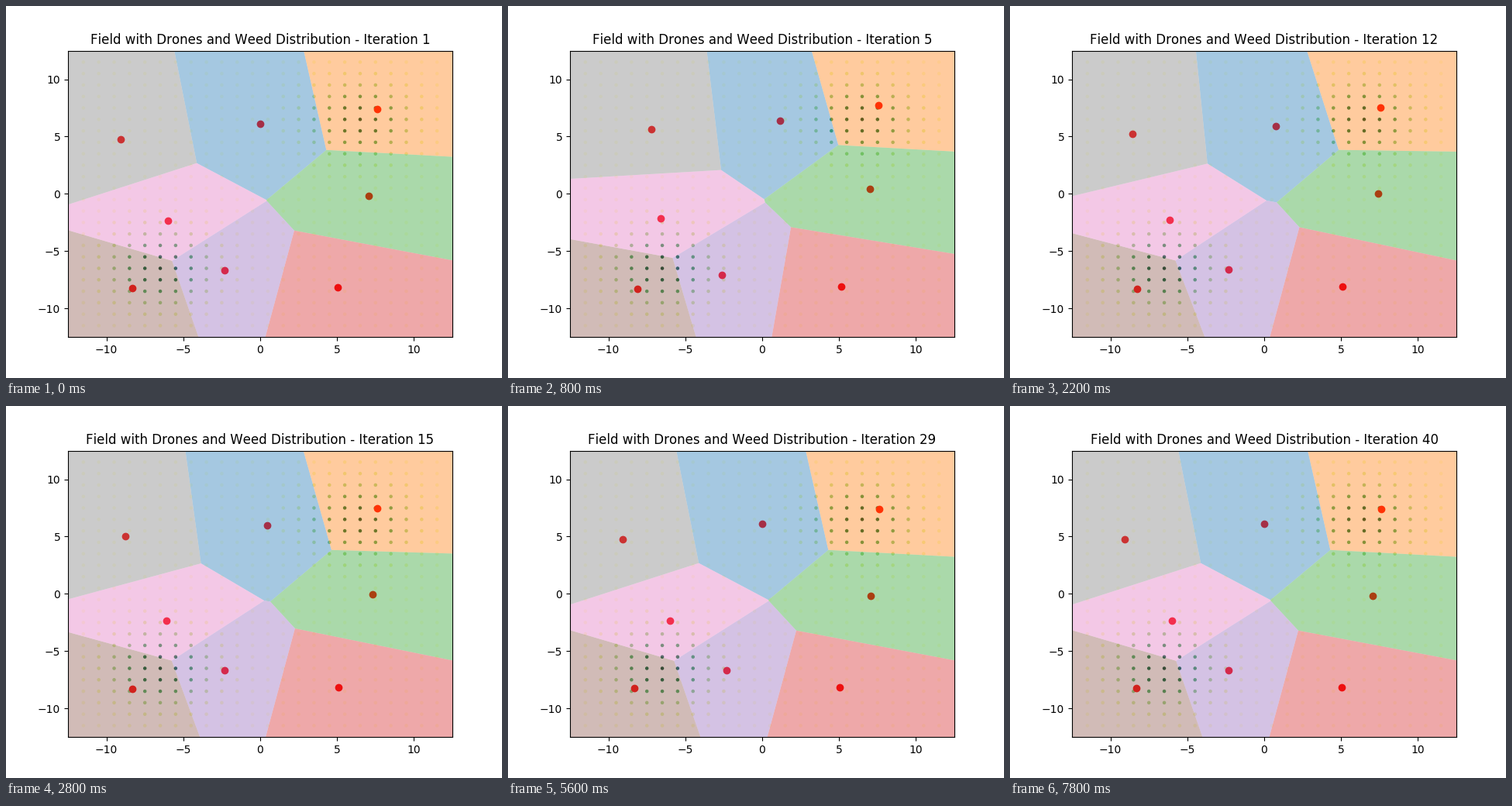
Write a matplotlib script that moves like this. It is 640 px wide and 480 px high and loops after 8 s.

```python
import numpy as np
import matplotlib.pyplot as plt
from matplotlib.animation import FuncAnimation
from matplotlib.patches import Polygon

plt.rcParams["text.kerning_factor"] = 6

FRAMES, STEP_MS = 40, 200
HALF = 12.5  # the field spans -HALF..HALF on both axes
CORNERS = HALF * np.array([(-1, -1), (1, -1), (1, 1), (-1, 1)])

# Each drone heads from its start past a turning point to its rest
START, TURN, REST = np.array([
    [(1.16, 6.39), (7.56, 7.74), (7.01, 0.43), (5.14, -8.09),
     (-2.62, -7.08), (-8.11, -8.29), (-6.6, -2.14), (-7.21, 5.64)],
    [(1.01, 5.84), (7.56, 7.6), (7.56, 0.1), (5.14, -8.09),
     (-2.32, -6.6), (-8.27, -8.36), (-6.2, -2.27), (-8.37, 5.37)],
    [(0, 6.11), (7.61, 7.4), (7.06, -0.18), (5.04, -8.16),
     (-2.32, -6.67), (-8.32, -8.22), (-6, -2.34), (-9.07, 4.76)],
])
START_AT, TURN_AT, REST_AT = 5, 9, 20


def drones_at(iteration):
    """Drone positions; the first iteration shows the settled state."""
    if iteration == 1 or iteration >= REST_AT:
        return REST
    if iteration < TURN_AT:
        u = (iteration - START_AT) / (TURN_AT - START_AT)
        return START + u * (TURN - START)
    u = (iteration - TURN_AT) / (REST_AT - TURN_AT)
    return TURN + u * (REST - TURN)


def clip(poly, mid, normal):
    """Keep the part of poly on the side of mid opposite to normal."""
    kept = []
    for a, b in zip(poly, poly[1:] + poly[:1]):
        da, db = np.dot(a - mid, normal), np.dot(b - mid, normal)
        if da <= 0:
            kept.append(a)
        if da * db < 0:
            kept.append(a + (b - a) * da / (da - db))
    return kept


def voronoi_cell(points, k):
    cell = list(CORNERS)
    for j, other in enumerate(points):
        if j != k:
            cell = clip(cell, (points[k] + other) / 2, other - points[k])
    return np.array(cell)


def weed_density(x, y):
    def patch(c):
        return np.exp(-((x - c) ** 2 + (y - c) ** 2) / 10)
    return patch(6.5) + patch(-6.5)


fig, ax = plt.subplots(figsize=(6.4, 4.8), dpi=100)
ax.set_xlim(-HALF, HALF)
ax.set_ylim(-HALF, HALF)
title = ax.set_title("")

gx, gy = np.meshgrid(np.arange(-11.5, 12), np.arange(-11.5, 12))
ax.scatter(gx, gy, c=weed_density(gx, gy), cmap="YlGn", s=5)
drones = ax.scatter(*REST.T, c="red", s=36)

# Translucent cells lie over the dots and tint them
cells = [ax.add_patch(Polygon(voronoi_cell(REST, k), facecolor=f"C{k}",
                              edgecolor="none", alpha=0.4))
         for k in range(len(REST))]


def draw(frame):
    iteration = frame + 1
    points = drones_at(iteration)
    drones.set_offsets(points)
    for k, cell in enumerate(cells):
        cell.set_xy(voronoi_cell(points, k))
    title.set_text(
        f"Field with Drones and Weed Distribution - Iteration {iteration}")
    return [drones, title, *cells]


anim = FuncAnimation(fig, draw, frames=FRAMES, interval=STEP_MS,
                     repeat=True, repeat_delay=0, blit=False)
plt.show()
```
